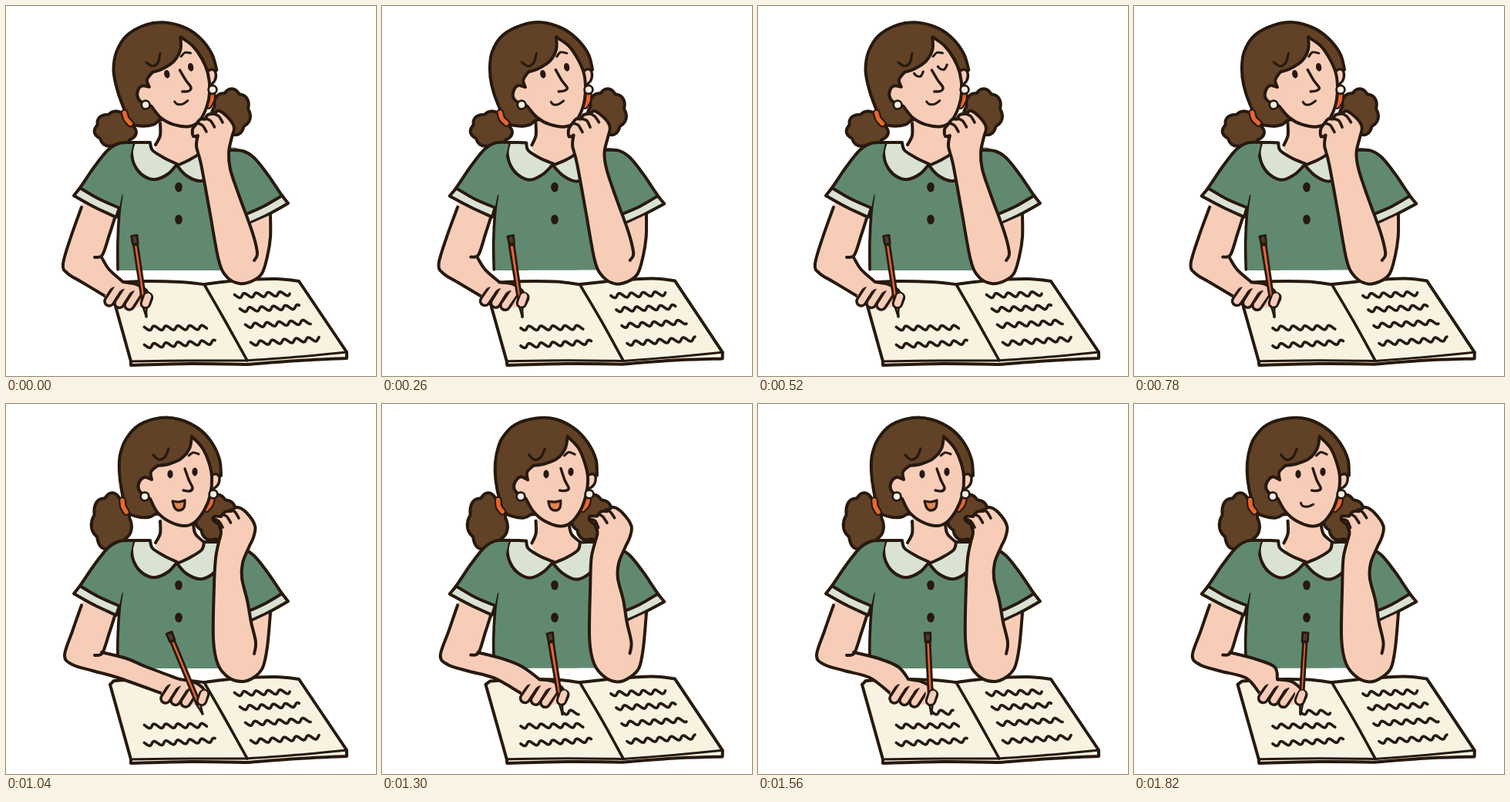
Animation of 480 by 480 pixels, one loop 2.08 s. Source, as an HTML page with a canvas:

```html
<!DOCTYPE html>
<html lang="en">
<head>
<meta charset="utf-8">
<title>Girl writing in a notebook</title>
<style>
html, body { margin: 0; width: 100%; height: 100%; overflow: hidden; background: #fff; }
canvas { display: block; width: 480px; height: 480px; }
</style>
</head>
<body>
<canvas id="stage" width="480" height="480"></canvas>
<script>
const ctx = document.getElementById('stage').getContext('2d');
const INK = '#27190d', HAIR = '#614226', SKIN = '#f8cdb8', GREEN = '#61896f',
  TRIM = '#d9e2d3', PAGE = '#f8f3e1', ORANGE = '#e8672f', PEARL = '#f4f0e2';
const STEP = 260, STEPS = 8;
let boil = 0;

// Smooth curve through points; ";" marks a corner
function curve(text) {
  const path = new Path2D();
  let last = null;
  for (const part of text.split(';')) {
    const n = part.trim().split(/\s+/).map(Number);
    const pts = last ? [last] : [];
    for (let i = 0; i < n.length; i += 2) {
      const s = n[i] * 1.7 + n[i + 1] * 2.3;
      pts.push([n[i] + boil * Math.sin(s), n[i + 1] + boil * Math.cos(s * 1.3)]);
    }
    if (!last) path.moveTo(...pts[0]);
    for (let i = 0; i < pts.length - 1; i++) {
      const b = pts[i], c = pts[i + 1], a = pts[i - 1] || b, d = pts[i + 2] || c;
      path.bezierCurveTo(b[0] + (c[0] - a[0]) / 6, b[1] + (c[1] - a[1]) / 6,
        c[0] - (d[0] - b[0]) / 6, c[1] - (d[1] - b[1]) / 6, c[0], c[1]);
    }
    last = pts[pts.length - 1];
  }
  return path;
}

function fill(text, color) {
  ctx.fillStyle = color;
  ctx.fill(curve(text));
}

function line(text, width = 4, color = INK) {
  ctx.lineWidth = width;
  ctx.strokeStyle = color;
  ctx.stroke(curve(text));
}

function shape(text, color, width) {
  fill(text, color);
  line(text, width);
}

function dot(x, y, rx, ry = rx, color = INK) {
  ctx.beginPath();
  ctx.ellipse(x, y, rx, ry, 0, 0, 7);
  ctx.fillStyle = color;
  ctx.fill();
}

function placed(x, y, angle, paint) {
  ctx.save();
  ctx.translate(x, y);
  ctx.rotate(angle);
  paint();
  ctx.restore();
}

function mirrored(axis, drop, paint) {
  ctx.save();
  ctx.transform(-1, 0, 0, 1, axis * 2, drop);
  paint();
  ctx.restore();
}

function pearl(x, y) {
  dot(x, y, 6.8);
  dot(x, y, 4, 4, PEARL);
}

function band(text) {
  line(text, 10);
  line(text, 5.5, ORANGE);
}

function squiggle(x0, y0, x1, y1) {
  const waves = (x1 - x0) / 15.5;
  ctx.beginPath();
  for (let t = 0; t <= 1.001; t += 0.01) {
    const w = Math.sin(t * waves * 2 * Math.PI - 0.6 + boil) * 2.7;
    ctx.lineTo(x0 + (x1 - x0) * t + w * 0.4, y0 + (y1 - y0) * t + w);
  }
  ctx.lineWidth = 3.6;
  ctx.strokeStyle = INK;
  ctx.stroke();
}

// Ponytail: an ellipse with round bumps
function tuft(x, y, rx, ry) {
  ctx.beginPath();
  for (let a = 0; a < 6.3; a += 0.05) {
    const r = 0.89 + 0.13 * Math.abs(Math.sin(a * 3.5 + 0.6));
    ctx.lineTo(x + rx * r * Math.cos(a), y + ry * r * Math.sin(a));
  }
  ctx.closePath();
  ctx.fillStyle = HAIR;
  ctx.strokeStyle = INK;
  ctx.lineWidth = 4;
  ctx.fill();
  ctx.stroke();
}

function eyes(closed) {
  for (const [x, y] of [[213, 91], [245, 88]]) {
    if (closed) line(`${x - 6} ${y - 2} ${x - 3} ${y + 2} ${x + 2} ${y + 3} ${x + 6} ${y - 2}`, 3.2);
    else dot(x, y, 3.6, 5.4);
  }
}

function mouth(open) {
  if (open) shape('216 126; 224 127 232 125; 231 134 225 138 219 135 216 126', '#e58452', 3.2);
  else line('216 128 219 132 226 133 233 130', 3);
}

function head(closed, open, lookUp) {
  shape('193 143 185 147 170 146 157 139 150 112 147 87 148 66 156 45 173 27 200 18 225 20 250 32 267 50 277 72 279 93; 262 100; 240 140; 193 143', HAIR);
  band('151 125 152 133 156 140');
  band('267 123 265 130 260 136');
  shape('264 93 273 91 277 96 274 106 264 113', SKIN, 3.4);
  shape('241 42 254 56 263 75 267 95 265 118 257 138 244 154 230 158 211 152 196 140 187 123; 178 118 172 110 173 101 180 95 189 98; 188 88 197 80; 211 78 227 71 238 58 241 42', SKIN);
  line('191 66 198 72 206 69 211 58', 3.2);
  pearl(180, 120);
  pearl(269, 117);
  line('237 67 243 63 250 65', 3);
  line('232 84 237 98 242 109 238 113 230 112', 3.4);
  ctx.translate(lookUp / 3, -lookUp);
  eyes(closed);
  mouth(open);
}

function sleeve() {
  fill('165 178 147 178 132 187 115 208 100 230 89 246; 147 262; 165 178', GREEN);
  line('165 177 147 178 132 187 115 208 100 230 89 246');
  shape('96 236; 120 250 147 262; 143 274; 115 261 88 246; 96 236', TRIM);
}

function collar() {
  shape('166 177; 163 190 167 207 178 220 193 225 210 218 222 205; 205 197 190 187 187 177; 166 177', TRIM);
}

function dress() {
  fill('200 148 200 168 193 184; 205 198 222 206 240 201 260 184; 247 172 243 150; 200 148', SKIN);
  line('200 152 200 168 194 180');
  line('243 156 246 169 259 181');
  fill('165 177; 147 190; 145 343; 285 343; 310 270; 300 184; 277 182; 222 206; 190 186; 165 177', GREEN);
  for (const y of [235, 277]) dot(224, y, 4.8, 6.3);
  collar();
  mirrored(222, 2, collar);
}

function book() {
  shape('135 364; 162 461; 162 466; 240 464 313 465; 380 460 442 457; 442 449; 380 357; 350 354 300 356 257 361; 225 358 180 357 140 359; 135 364', PAGE);
  line('162 461 240 460 313 460; 380 455 442 449', 3);
  line('257 361 284 408 313 460', 3.6);
  for (let i = 0; i < 2; i++) squiggle(180, 418 + 23 * i, 260 + 12 * i, 417 + 19 * i);
  for (let i = 0; i < 4; i++) {
    const y = 376 + 17 * i + 1.2 * i * i;
    squiggle(297 + 7 * i, y, 368 + 13 * i, y - 3 - i);
  }
}

function pencil(lean, height) {
  const top = -Math.hypot(lean, height);
  placed(0, 0, Math.atan2(lean, height), () => {
    shape('0 0; -2.5 -14; 2.5 -14; 0 0', SKIN, 2.6);
    line('0 0; 0 -5', 3.4);
    shape(`-2.6 -14; -2.6 ${top + 14}; 2.6 ${top + 14}; 2.6 -14; -2.6 -14`, ORANGE, 2.8);
    shape(`-3.4 ${top + 13}; -3.8 ${top + 2}; 3.8 ${top + 2}; 3.4 ${top + 13}; -3.4 ${top + 13}`, '#51392d', 2.8);
  });
}

// Hand around the pencil, measured from the pencil point
function gripHand(lean) {
  fill('-30 -45 -12 -42 1 -33 6 -22; -10 -12 -35 -16 -54 -27; -30 -45', SKIN);
  line('-30 -45 -13 -42 -1 -35 5 -25');
  for (let i = 0; i < 3; i++) {
    const x = -48 + 13 * i, y = -20 + 2.5 * i;
    line(`${x} ${y}; ${x + 7} ${y - 11}`, 15.5);
    line(`${x} ${y}; ${x + 11} ${y - 17}`, 8.5, SKIN);
  }
  pencil(lean, 107);
  line('2 -25; -1 -17', 14.5);
  line('2 -26; -1 -17', 8.5, SKIN);
}

function writingArm(x, y, lean, outer, upper) {
  const under = `${outer} ${x - 54} ${y - 27}`;
  const over = `${upper} ${x - 30} ${y - 45}`;
  const back = over.split(' ').map(Number);
  let returning = '';
  for (let i = back.length - 2; i >= 0; i -= 2) returning += `${back[i]} ${back[i + 1]} `;
  fill(`100 245; ${under}; ${returning}; 134 297 143 260; 100 245`, SKIN);
  line(under);
  line('142 272 134 297 125 323 115 326');
  line(over);
  placed(x, y, 0, () => gripHand(lean));
}

function knuckles(x, y) {
  for (let i = 0; i < 3; i++) {
    const a = x + 10.5 * i, b = y - 6 * i;
    line(`${a} ${b} ${a + 6} ${b + 3} ${a + 11} ${b + 11}`, 3.6);
  }
}

function restingArm(writing) {
  const outer = writing
    ? '343 271 339 315 333 342 321 355 306 360 289 355 275 338 269 305 270 235 272 200 276 179'
    : '343 271 343 300 339 325 332 347 319 357 303 360 287 352 276 330 264 265 253 205 247 182 249 168';
  const fist = writing
    ? '279 166 276 156; 269 151 270 146 279 146; 284 140 292 139; 300 134 312 141 323 158 321 173 315 186 307 206 306 226 313 255 318 283'
    : '243 169 242 160 247 153; 252 147 258 147; 262 141 270 140; 277 136 290 147 296 158 293 170 289 190 291 212 302 245 316 283';
  fill(`${outer}; ${fist}; 343 271`, SKIN);
  line(outer + ' ; ' + fist + (writing ? ' 324 309 322 324' : ' 323 305 326 322 322 330'));
  if (writing) knuckles(270, 149);
  else knuckles(249, 152);
}

function draw(step) {
  const writing = step >= 4;
  boil = step % 2 ? 0.5 : 0;
  ctx.fillStyle = '#fff';
  ctx.fillRect(0, 0, 480, 480);
  ctx.lineCap = ctx.lineJoin = 'round';

  if (writing) {
    tuft(137, 153, 26, 37);
    tuft(273, 148, 27, 30);
  } else {
    tuft(142, 160, 27, 23);
    tuft(292, 138, 25, 30);
  }
  dress();
  placed(224, 118, writing ? 0 : -0.19, () => {
    ctx.translate(-224, -118);
    head(step === 2, writing && step < 7, writing ? 0 : 5);
  });
  book();
  line('150 246 147 268 145 305 145 342', 3.6);

  if (writing) {
    const x = [255, 234, 225, 216][step - 4];
    if (step > 4) squiggle(x, 400, 254, 400);
    writingArm(x, 402, (221 - x) * 1.3,
      '98 261 86 295 76 326 86 338 112 346 145 355', '124 322 156 330 182 341');
  } else {
    writingArm(182, 403, -16, '98 261 84 300 74 335 80 347 98 358', '124 326 134 342');
  }
  sleeve();
  mirrored(227, 10, sleeve);
  restingArm(writing);
}

let shown = -1;
const start = performance.now();
function tick() {
  const step = Math.floor((performance.now() - start) / STEP) % STEPS;
  if (step !== shown) draw(shown = step);
  requestAnimationFrame(tick);
}
draw(shown = 0);
requestAnimationFrame(tick);
</script>
</body>
</html>
```
